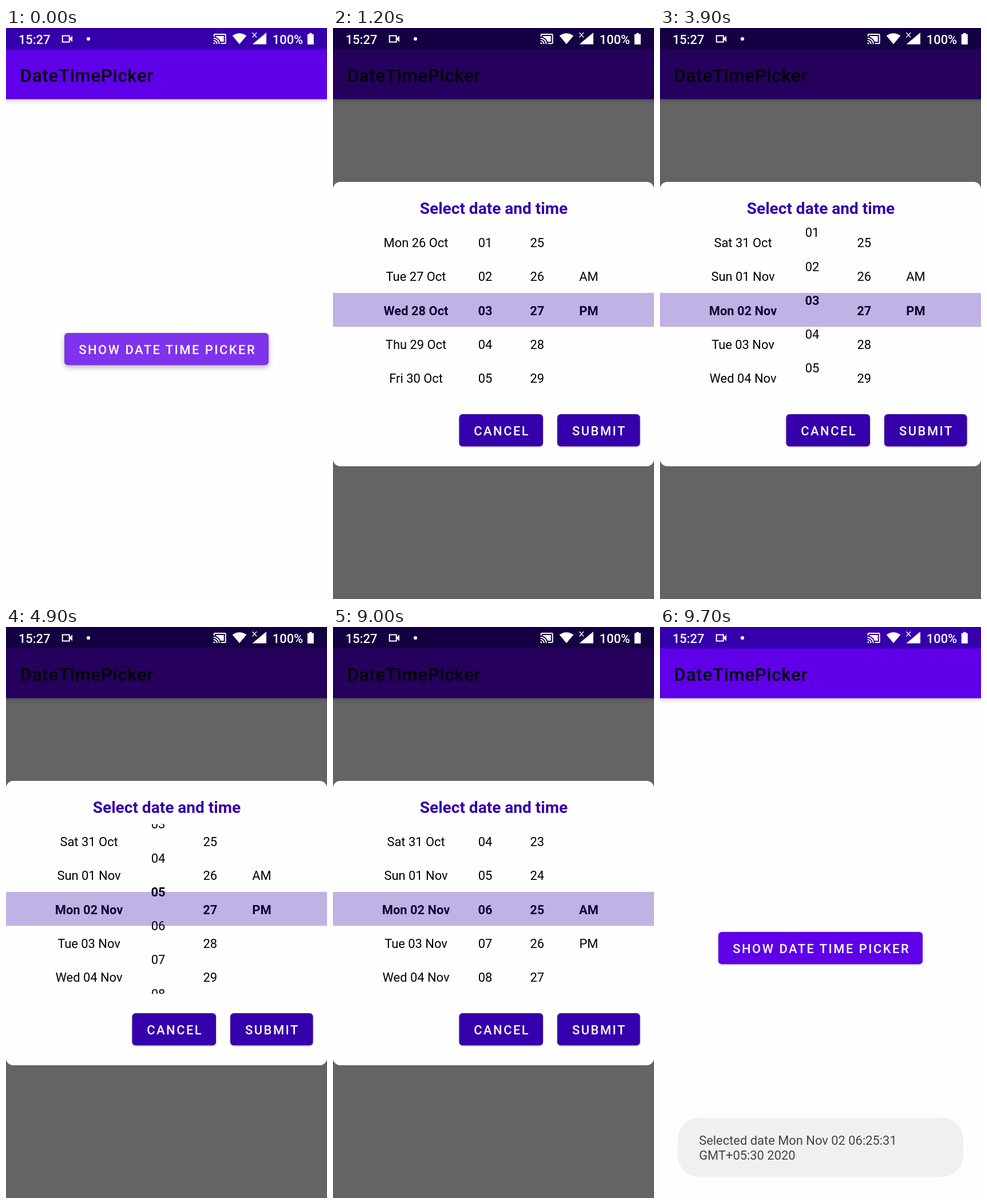
Recreate the animation shown at these times as an HTML page. Size 561 px wide and 998 px high, loop 9800 ms.

```html
<!DOCTYPE html>
<html lang="en">
<head>
<meta charset="utf-8">
<title>DateTimePicker</title>
<style>
  html, body { margin: 0; width: 100%; height: 100%; overflow: hidden; background: #fdfefd; }
  svg { display: block; width: 561px; height: 998px; }
  text { font: 400 21.9px Roboto, sans-serif; white-space: pre; }
  .mid { text-anchor: middle; }
  .medium { font-weight: 500; }
  .label { font-weight: 500; fill: #fff; letter-spacing: 2.5px; }
  .raised { filter: drop-shadow(0 1.5px 1.5px rgba(0, 0, 0, .3)); }
</style>
</head>
<body>
<svg viewBox="0 0 561 998">
  <defs>
    <linearGradient id="fade" x2="0" y2="1">
      <stop stop-opacity=".17"/>
      <stop offset=".4" stop-opacity=".06"/>
      <stop offset="1" stop-opacity="0"/>
    </linearGradient>
    <clipPath id="window"><rect y="344.5" width="561" height="296.5"/></clipPath>
  </defs>

  <rect width="561" height="998" fill="#fdfefd"/>
  <rect y="124.5" width="561" height="10" fill="url(#fade)"/>
  <rect y="37" width="561" height="87.5" fill="#5f00e8"/>
  <rect width="561" height="37.5" fill="#3500ac"/>
  <text class="medium" x="24.6" y="93.7" style="font-size:31.2px;letter-spacing:.75px">DateTimePicker</text>

  <rect id="show" x="102" y="533" width="357" height="56.3" rx="6" fill="#5f00e8"/>
  <rect id="ripple" x="102" y="533" width="357" height="56.3" rx="6" fill="#fff"/>
  <text class="label mid" x="282.2" y="570.2">SHOW DATE TIME PICKER</text>

  <rect id="dim" width="561" height="998"/>

  <g fill="#fff">
    <text class="medium" x="21.9" y="27.5">15:27</text>
    <path d="M98.7 13.5h12v11h-12z" fill="none" stroke="#fff" stroke-width="2"/>
    <path d="M111 18l5-4.5v11l-5-4.5z"/>
    <circle cx="144" cy="19" r="3.1"/>
    <path transform="translate(361.7 7)" d="M1 18v3h3c0-1.66-1.34-3-3-3zm0-4v2c2.76 0 5 2.24 5 5h2c0-3.87-3.13-7-7-7zm18-7H5v1.63c3.96 1.28 7.09 4.41 8.37 8.37H19V7zM1 10v2c4.97 0 9 4.03 9 9h2c0-6.08-4.93-11-11-11zm20-7H3c-1.1 0-2 .9-2 2v3h2V5h18v14h-7v2h7c1.1 0 2-.9 2-2V5c0-1.1-.9-2-2-2z"/>
    <path d="M395.7 13.6Q408 5 420.3 13.6L408 28.2z"/>
    <path d="M455 8v20.5h-24.5z"/>
    <path d="M430.5 8l7.5 8.5M438 8l-7.5 8.5" stroke="#fff" stroke-width="1.3"/>
    <text class="medium" x="465.8" y="27.5">100%</text>
    <path d="M530 8.7h4.6v2h3.2v18h-11v-18h3.2z"/>
  </g>

  <g id="dialog">
    <rect y="269" width="561" height="497" rx="12.5" fill="#fdfefd"/>
    <text class="mid" x="281" y="324.6" fill="#3500ac" style="font-size:28.05px;font-weight:700">Select date and time</text>
    <g id="wheels" clip-path="url(#window)"></g>
    <rect y="463" width="561" height="59.3" fill="#3500ac" opacity=".3"/>
    <rect class="raised" x="220.5" y="675" width="146.5" height="56.3" rx="6" fill="#3500ac"/>
    <text class="label mid" x="295.2" y="712.2">CANCEL</text>
    <rect class="raised" x="392" y="675" width="144.5" height="56.3" rx="6" fill="#3500ac"/>
    <rect id="submitRipple" x="392" y="675" width="144.5" height="56.3" rx="6" fill="#fff"/>
    <text class="label mid" x="465.4" y="712.2">SUBMIT</text>
  </g>

  <g id="toast">
    <rect x="31" y="858" width="499" height="103" rx="37" fill="#eff1ef"/>
    <g fill="#434443">
      <text x="68.2" y="905.3">Selected date Mon Nov 02 06:25:31</text>
      <text x="68.2" y="931.3">GMT+05:30 2020</text>
    </g>
  </g>
</svg>
<script>
const LOOP = 9800, STEP = 100, ROW = 59.25, BASE = 501.6, SPAN = 3;
const $ = id => document.getElementById(id);
const clamp = v => Math.min(1, Math.max(0, v));
const ramp = (t, from, to) => clamp((t - from) / (to - from));
const easeOut = p => 1 - (1 - p) ** 2;
const pad = n => String(n).padStart(2, '0');

function dateName(n) {
  const [day, date, month] = new Date(Date.UTC(2020, 9, 28 + n)).toUTCString().replace(',', '').split(' ');
  return `${day} ${date} ${month}`;
}

// path: [time, position] of the scroll; picks: [time, row] set bold once it rests
const wheels = [
  { x: 145, name: dateName,
    path: [[1600, 0], [1700, .35], [1800, 1.2], [1900, 2.6], [2100, 4.6], [2300, 5.85], [2400, 6],
           [2800, 6], [2900, 5.857], [3100, 5.25], [3300, 5.03], [3400, 5]],
    picks: [[0, 0], [2500, 6], [3500, 5]] },
  { x: 266, name: n => pad((n + 11) % 12 + 1),
    path: [[3800, 3], [3900, 3.3], [4100, 4.5], [4300, 5], [4800, 5], [4900, 5.52], [5100, 5.92], [5300, 6]],
    picks: [[0, 3], [4400, 5], [5400, 6]] },
  { x: 356.7, name: n => pad((n + 60) % 60),
    path: [[5800, 27], [5900, 26.7], [6100, 25.15], [6200, 24.95], [6500, 25]],
    picks: [[0, 27], [6600, 25]] },
  { x: 447, name: n => ['AM', 'PM'][n] || '',
    path: [[7000, 1], [7100, .75], [7200, .3], [7300, 0]],
    picks: [[0, 1], [7400, 0]] }
];

for (const w of wheels) {
  w.rows = Array.from({ length: 2 * SPAN + 1 }, () => {
    const el = document.createElementNS('http://www.w3.org/2000/svg', 'text');
    el.setAttribute('class', 'mid');
    el.setAttribute('x', w.x);
    return $('wheels').appendChild(el);
  });
}

function follow(path, t) {
  const i = path.findIndex(k => k[0] > t);
  if (i < 0) return path[path.length - 1][1];
  if (i === 0) return path[0][1];
  const [t0, a] = path[i - 1], [t1, b] = path[i];
  return a + (b - a) * ramp(t, t0, t1);
}

function drawWheel(w, t) {
  const pos = follow(w.path, t), first = Math.round(pos) - SPAN;
  const picked = w.picks.filter(k => k[0] <= t).pop()[1];
  w.rows.forEach((el, i) => {
    const n = first + i;
    el.textContent = w.name(n);
    el.setAttribute('y', BASE + (n - pos) * ROW);
    el.style.fontWeight = n === picked ? 700 : 400;
  });
}

function draw(t) {
  const press = 1 - ramp(t, 0, 400);
  $('ripple').style.opacity = .2 * press;
  $('show').style.filter = `drop-shadow(0 ${1.5 + 3 * press}px ${1.5 + 3.5 * press}px rgba(0,0,0,.28))`;

  const enter = easeOut(ramp(t, 100, 450)), leave = ramp(t, 9100, 9400);
  const shown = enter * (1 - leave), scale = .9 + .1 * shown;
  $('dim').style.opacity = .605 * shown;
  $('dialog').style.opacity = shown;
  $('dialog').setAttribute('transform', `translate(280.5 517.5) scale(${scale}) translate(-280.5 -517.5)`);
  $('submitRipple').style.opacity = .2 * ramp(t, 9000, 9100);
  wheels.forEach(w => drawWheel(w, t));

  $('toast').style.opacity = ramp(t, 9300, 9700);
}

function tick(now) {
  draw(Math.floor(now % LOOP / STEP) * STEP);
  requestAnimationFrame(tick);
}
tick(performance.now());
</script>
</body>
</html>
```
